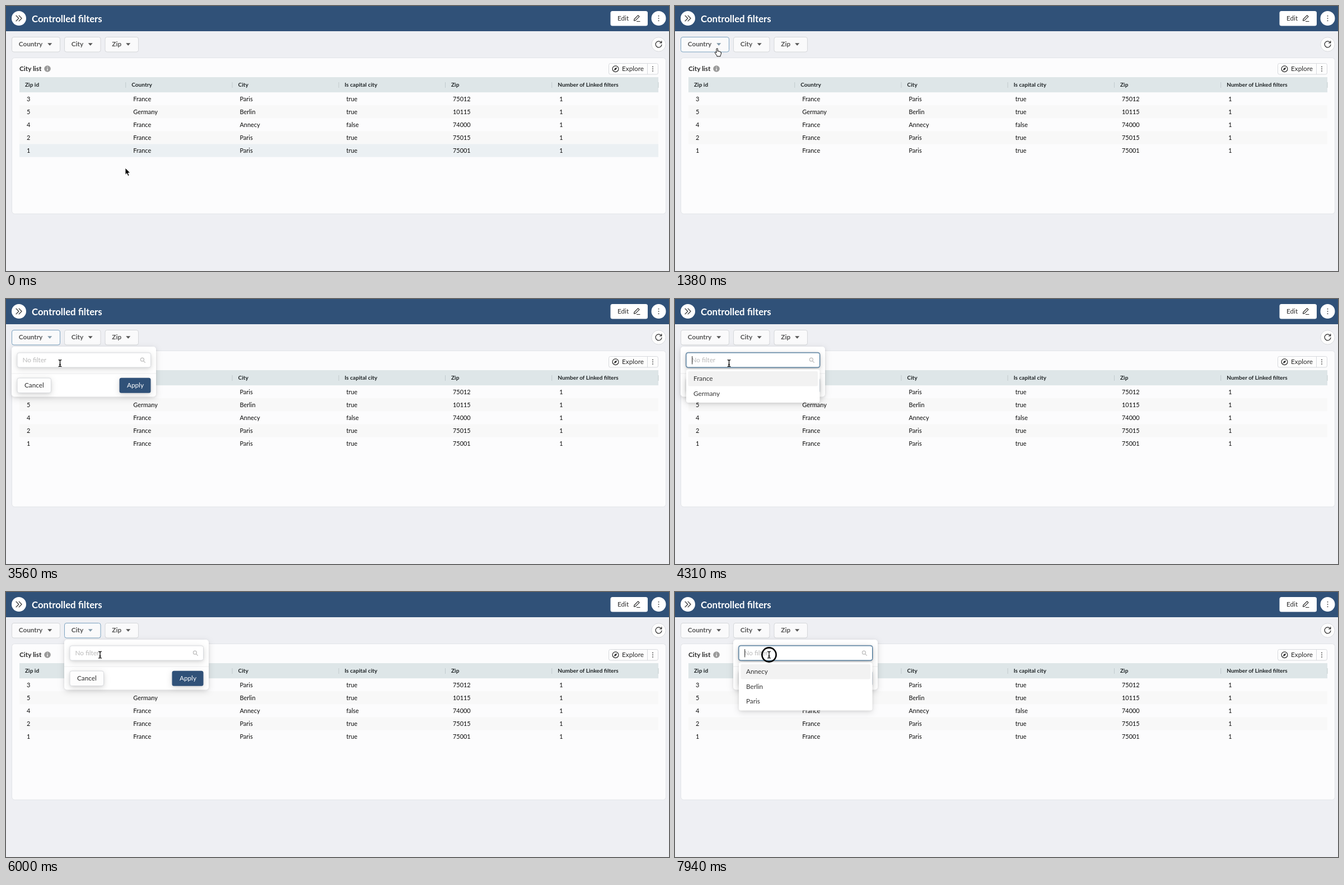
Animation, 1184 px wide and 473 px high, one loop 8000 ms. Source, as an HTML page:

```html
<!DOCTYPE html>
<html lang="en">
<head>
<meta charset="utf-8">
<title>Controlled filters</title>
<style>
  html, body { margin: 0; width: 100%; height: 100%; overflow: hidden; background: #eeeff3; }
  svg { display: block; width: 1184px; height: 473px; font: 11.76px Lato, sans-serif; fill: #2a2a2a; }
  .bold { font-weight: 700; }
  .line { fill: none; stroke: #2a2a2a; stroke-width: 1.2; stroke-linecap: round; stroke-linejoin: round; }
  .box { fill: #fdfdfd; stroke: #d8dade; }
  .cells { font-size: 10.92px; fill: #0c0c0c; }
  .heads { font-size: 10.08px; font-weight: 700; fill: #1f2426; }
  .filter text, .filter path { fill: #555; }
  .filter rect { fill: #fafafb; stroke: #d5d7da; }
  .filter.on rect { stroke: #7ba2c0; }
  .filter.on path { fill: #8199a9; }
  .panel > rect { filter: drop-shadow(0 3px 6px #0002) drop-shadow(0 1px 2px #0001); }
  .hint { fill: #b9b9b9; }
  .option { fill: #333; }
</style>
</head>
<body>
<svg id="stage" viewBox="0 0 1184 473"></svg>
<script>
const LOOP = 8000;
const NAVY = '#305178';
const COLUMN = 190.25, ROW = 23.05, ROWS_TOP = 154.3;

const heads = ['Zip id', 'Country', 'City', 'Is capital city', 'Zip', 'Number of Linked filters'];
const rows = [
  [3, 'France', 'Paris', true, 75012, 1],
  [5, 'Germany', 'Berlin', true, 10115, 1],
  [4, 'France', 'Annecy', false, 74000, 1],
  [2, 'France', 'Paris', true, 75015, 1],
  [1, 'France', 'Paris', true, 75001, 1]
];
const filters = [
  { label: 'Country', x: 10, width: 87 },
  { label: 'City', x: 104, width: 65.5 },
  { label: 'Zip', x: 176.5, width: 60.5 }
];
const panels = [
  { dx: 0, options: ['France', 'Germany'], open: 2050, loaded: 2600, drop: 4080, close: 4960, phase: 112,
    focus: 1950, caret: [[4200, 4760]] },
  { dx: 94, options: ['Annecy', 'Berlin', 'Paris'], open: 5095, loaded: 5650, drop: 6722, close: Infinity, phase: 292,
    focus: 5000, caret: [[6850, 7310], [7880, LOOP]] }
];
// time, x, y of the pointer's hot spot
const path = [
  [0, 213, 289], [220, 207, 345], [820, 121.5, 137], [900, 121.5, 137], [1500, 70, 69], [2080, 70, 69],
  [2190, 74, 87], [2430, 96.5, 114.5], [4640, 96.5, 114.5], [4920, 130.5, 70], [5260, 130.5, 70],
  [5850, 168, 112], [LOOP, 168, 112]
];
const clicks = [[1900, 2030], [4050, 4180], [4930, 5050], [6650, 6780], [7880, LOOP]];

const rect = (x, y, w, h, rx, attrs = '') =>
  `<rect x="${x}" y="${y}" width="${w}" height="${h}" rx="${rx}" ${attrs}/>`;
const text = (x, y, value, attrs = '') => `<text x="${x}" y="${y}" ${attrs}>${value}</text>`;
const circle = (x, y, r, attrs = '') => `<circle cx="${x}" cy="${y}" r="${r}" ${attrs}/>`;
const dots = (x, y, gap) => [-gap, 0, gap].map(d => circle(x, y + d, 1, 'fill="#555"')).join('');

const header = () => rect(0, 0, 1184, 45, 0, `fill="${NAVY}"`) +
  circle(23, 22, 13, 'fill="#fff"') +
  '<path class="line" d="M18 17.2l4.8 4.8-4.8 4.8M23.2 17.2l4.8 4.8-4.8 4.8"/>' +
  text(46, 28.5, 'Controlled filters', 'class="bold" font-size="16.8" fill="#fff"') +
  rect(1079.5, 9, 66.5, 26.5, 3.5, 'fill="#fff"') + text(1092, 26, 'Edit') +
  '<path class="line" d="M1121.5 26.2l.5-2.7 6.8-6.8 2.2 2.2-6.8 6.8zM1126.5 27.5h5.5"/>' +
  circle(1165.5, 22, 13, 'fill="#fff"') + dots(1165.5, 22, 4.2);

const filterButton = ({ label, x, width }) => `<g class="filter">` +
  rect(x + .5, 55.5, width - 1, 26.5, 3.5) + text(x + 12.8, 72.3, label, 'class="bold"') +
  `<path d="M${x + width - 22.8} 66.2h8l-4 4.6z"/></g>`;

const toolbar = () => filters.map(filterButton).join('') +
  circle(1165.5, 68.5, 12.7, 'class="box"') +
  '<path class="line" stroke-width="1.4" d="M1170.3 65.6a5.5 5.5 0 1 0 .7 3.6M1170.8 62.6v3.4h-3.4"/>';

const card = () => rect(10.5, 92.5, 1168, 278.5, 5, 'fill="#fcfcfd" stroke="#e2e4e8"') +
  text(24, 116, 'City list', 'class="bold"') + circle(74, 112, 5.8, 'fill="#9a9a9a"') +
  '<path d="M74 111.3v4M74 108.4v1.4" stroke="#fff" stroke-width="1.3"/>' +
  rect(1076.5, 102.5, 88, 19.5, 3, 'class="box"') + '<path d="M1145.5 102.5v19.5" stroke="#d8dade"/>' +
  circle(1088.5, 112.2, 5.4, 'class="line"') + '<path d="M1091.3 109.4l-1.7 4-4 1.7 1.7-4z"/>' +
  text(1100, 116, 'Explore') + dots(1155, 112.2, 3.8);

const table = () => rect(24, 127, 1141, 27.3, 0, 'fill="#dee6e8"') +
  '<g class="heads">' + heads.map((name, i) => text(34 + COLUMN * i, 144.4, name) +
    `<path d="M${23.5 + COLUMN * (i + 1)} 136v10" stroke="#c2cbce"/>`).join('') + '</g><g class="cells">' +
  rows.map((cells, r) => rect(24, ROWS_TOP + ROW * r, 1141, ROW, 0, 'class="row"') +
    cells.map((cell, i) => text(37 + COLUMN * i, 169.8 + ROW * r, cell)).join('')).join('') + '</g>';

const panel = ({ dx, options }) => `<g transform="translate(${dx})"><g class="panel">` +
  rect(10, 85, 258, 89.5, 5, 'fill="#fff"') +
  '<path d="M10 133h258" stroke="#eeeeef"/>' +
  rect(20, 141, 60.5, 26.5, 3.5, 'class="box"') + text(33, 158, 'Cancel') +
  rect(202.5, 140.8, 56, 27, 3.5, `fill="${NAVY}"`) + text(216, 158, 'Apply', 'fill="#fff"') +
  rect(18.7, 94.7, 241, 28.6, 4.5, 'class="glow" fill="#305178" opacity=".3"') +
  rect(20, 96, 238.5, 26, 3.5, 'class="input"') + text(29.5, 113, '', 'class="hint"') +
  '<path class="spin" d="M246.8 106.2a4 4 0 0 1 0 5.6" fill="none" stroke="#bbb"/>' +
  '<path class="search line" style="stroke:#bcbcbc" d="M245.6 110.6l2.8 2.8M246.4 108.2a3 3 0 1 0-6 0a3 3 0 1 0 6 0"/>' +
  '<path class="caret" d="M30.7 102v14.5" stroke="#222"/></g>' +
  `<g class="panel drop">` + rect(20, 125.5, 238.5, 6.7 + 26.4 * options.length, 4, 'fill="#fff"') +
  '<path d="M23.4 131q0-2 2-2h227.6q2 0 2 2v22.5q0 2-2 2h-227.6q-2 0-2-2z" fill="#f2f2f2"/>' +
  options.map((name, i) => text(33, 146.2 + 26.4 * i, name, 'class="option"')).join('') + '</g></g>';

const pointer = () => '<g id="pointer">' +
  circle(0, 0, 12.6, 'id="ring" fill="none" stroke="#000" stroke-width="2.6"') +
  '<path id="arrow" d="M0 0v12.2l2.8-2.5 2.1 4.8 2.2-1-2.1-4.6h3.8z" fill="#000" stroke="#fff" stroke-width=".9"/>' +
  '<path id="hand" d="M-1.3 1.2q0-1.5 1.2-1.5t1.2 1.5v4q.2-1 1.3-.8t1 1.2q.4-.8 1.3-.5t.9 1.2q1.3-.6 1.6.8c0 3-.8 4-1.4 5.8v1h-6.2v-1.2c-1-1.6-2.8-3.6-3.6-5.2-.2-1.2 1-1.6 1.8-.9l.9 1z" fill="#fff" stroke="#000" stroke-width="1"/>' +
  '<path id="beam" d="M-2.8-5.8q2.8 0 2.8 1.8 0-1.8 2.8-1.8M0-4v8.5M-2.8 6q2.8 0 2.8-1.6 0 1.6 2.8 1.6M-1.5 2.3h3" fill="none" stroke="#000" stroke-width="1.3"/></g>';

const stage = document.getElementById('stage');
stage.innerHTML = header() + toolbar() + card() + table() + panels.map(panel).join('') + pointer();

const byId = id => document.getElementById(id);
const all = selector => [...stage.querySelectorAll(selector)];
const rowRects = all('.row'), buttons = all('.filter');
const bodies = all('.panel:not(.drop)'), drops = all('.drop');
const clamp = v => Math.min(1, Math.max(0, v));
const easeOut = p => 1 - (1 - p) ** 4;
const within = (t, spans) => spans.some(([from, to]) => t >= from && t < to);
const show = (el, visible) => el.setAttribute('visibility', visible ? 'inherit' : 'hidden');

function pointerAt(t) {
  const i = path.findIndex(p => p[0] > t);
  const [t0, x0, y0] = path[i - 1], [t1, x1, y1] = path[i];
  const p = (t - t0) / (t1 - t0), k = p * p * (3 - 2 * p);
  return [x0 + (x1 - x0) * k, y0 + (y1 - y0) * k];
}

// Unfold from the top edge while fading in, the reverse on closing
function unfold(el, top, t, open, close) {
  const leave = clamp((t - close) / 200);
  const k = easeOut(clamp((t - open) / 200)) * (1 - leave * leave);
  const s = .8 + .2 * k;
  show(el, k > 0);
  el.setAttribute('opacity', k);
  el.setAttribute('transform', `translate(0 ${top * (1 - s)}) scale(1 ${s})`);
}

function drawPanel({ open, loaded, drop, close, phase, caret }, i, t) {
  const body = bodies[i], part = name => body.querySelector('.' + name);
  const ready = t >= loaded, focused = t >= drop;
  unfold(body, 85, t, open, close);
  unfold(drops[i], 125.5, t, drop, close - 20);
  part('hint').textContent = ready ? 'No filter' : 'Loading...';
  part('input').setAttribute('fill', ready ? '#fff' : '#f1f1f2');
  part('input').setAttribute('stroke', focused ? '#3f7398' : '#d8dade');
  part('glow').setAttribute('opacity', .42 * clamp((t - drop - 60) / 200));
  part('spin').setAttribute('transform', `rotate(${phase + t * .36} 244 109)`);
  show(part('spin'), !ready && t >= open);
  show(part('search'), ready && t < close + 200);
  show(part('caret'), within(t, caret));
}

function draw(t) {
  const [x, y] = pointerAt(t);
  const hoverRow = t < 90 ? 4 : Math.floor((y - ROWS_TOP) / ROW);
  const noPanel = t < panels[0].open;
  rowRects.forEach((el, i) => el.setAttribute('fill',
    noPanel && i === hoverRow ? '#ebf0f3' : i % 2 ? '#f8f8f8' : '#fcfcfd'));

  let overButton = false;
  buttons.forEach((el, i) => {
    const { x: left, width } = filters[i], p = panels[i];
    const hover = y > 55 && y < 82 && x > left && x < left + width;
    overButton ||= hover;
    el.classList.toggle('on', hover || !!p && t >= p.focus && t < p.drop);
  });
  panels.forEach((p, i) => drawPanel(p, i, t));

  const overHead = noPanel && y > 127 && y < ROWS_TOP;
  const overInput = y > 96 && y < 122 && panels.some(p => t >= p.loaded && t < p.close);
  const hand = overButton || overHead;
  show(byId('hand'), hand);
  show(byId('beam'), overInput && !hand);
  show(byId('arrow'), !hand && !overInput);
  show(byId('ring'), within(t, clicks));
  byId('pointer').setAttribute('transform', `translate(${x} ${y})`);
}

function tick() {
  draw(performance.now() % LOOP);
  requestAnimationFrame(tick);
}
tick();
</script>
</body>
</html>
```
